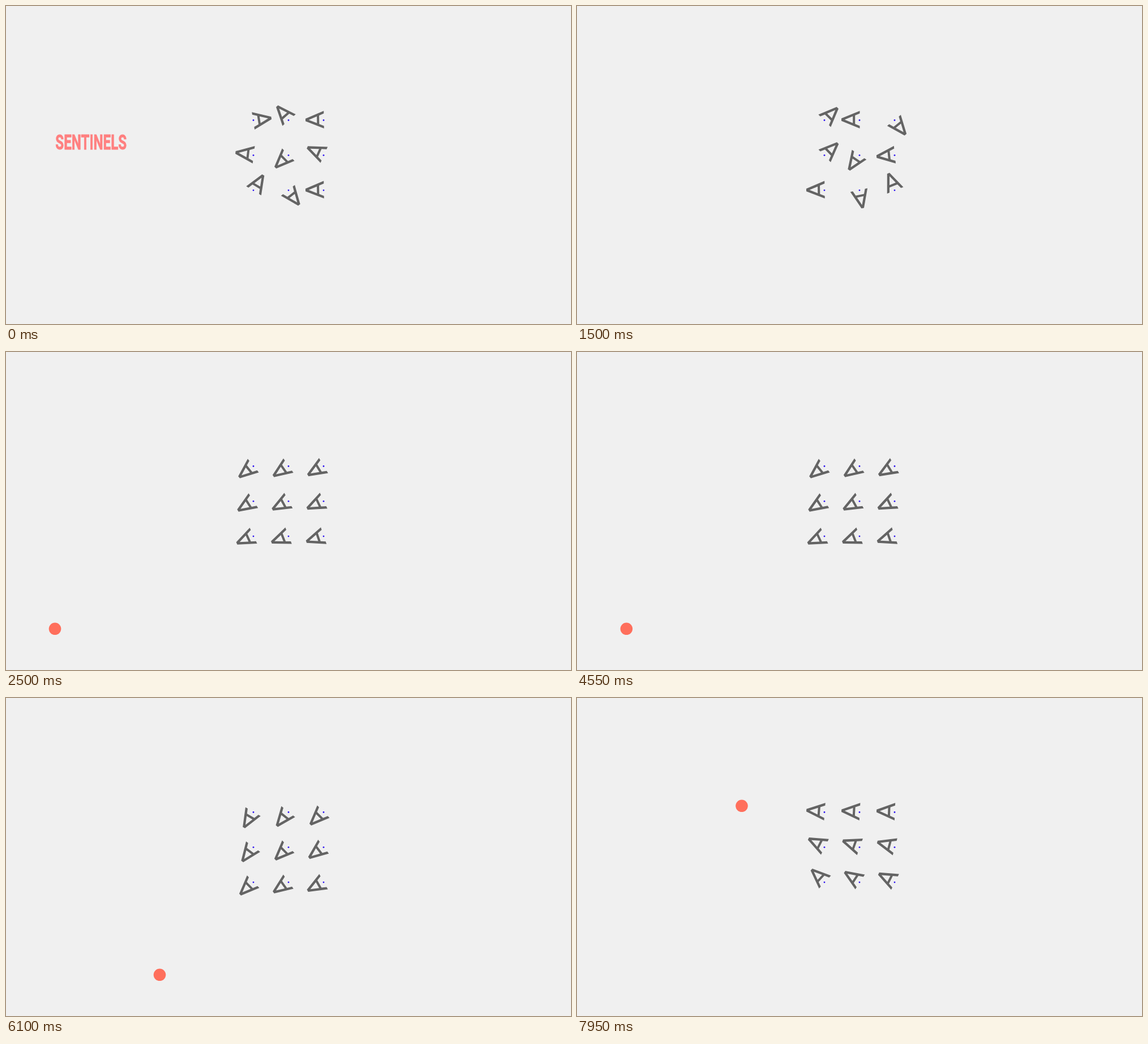
Recreate the animation shown at these times as an HTML page. Size 998 by 561 pixels, loop 8 s.

```html
<!DOCTYPE html>
<html lang="en">
<head>
<meta charset="utf-8">
<title>Sentinels</title>
<style>
  html, body { margin: 0; width: 100%; height: 100%; overflow: hidden; background: #f0f0f0; }
  svg { display: block; width: 998px; height: 561px; }
  #title { font: 700 37.5px Roboto, "Liberation Sans", sans-serif; fill: #ff8080; stroke: #ff8080; stroke-width: .8; }
  #ball { fill: #ff6f5c; }
  #letters path { fill: #646464; fill-rule: evenodd; }
  #letters circle { fill: #2a10f0; }
</style>
</head>
<body>
<svg viewBox="0 0 998 561">
  <text id="title" transform="translate(87.3 253) scale(.645 1)">SENTINELS</text>
  <g id="letters"></g>
  <circle id="ball" r="10.8"/>
</svg>
<script>
const LOOP = 8000;
const GLYPH = 'M-14.5 .5L-1.3-32H3.3L16.5 .5H11.9L8.5-7.8H-6.5L-9.9 .5ZM-4.9-11.8H6.9L1-26.3Z';
const REST_Y = 488.3;

// Headings in degrees, clockwise from up, before the letters find the ball
const headings = [
  [81, 85, 45], [-41, -62, -90], [-91, 0, 141],
  [-83, -18, 46], [-135, -131, -146], [-66, -62, -96],
  [31, -39, -91], [142, 168, 168], [-91, 130, -22]
];

const title = document.getElementById('title');
const ball = document.getElementById('ball');
const group = document.getElementById('letters');

function add(tag, attrs) {
  const el = document.createElementNS('http://www.w3.org/2000/svg', tag);
  for (const key in attrs) el.setAttribute(key, attrs[key]);
  return group.appendChild(el);
}

const letters = headings.map((keys, i) => {
  const x = 437 + (i % 3) * 62;
  const y = 201.5 + Math.floor(i / 3) * 61.8;
  const el = add('path', { d: GLYPH });
  add('circle', { cx: x, cy: y, r: 1.4 });
  return { x, y, keys, el };
});

const clamp = v => Math.min(1, Math.max(0, v));
const mix = (a, b, k) => a + (b - a) * k;
const ease = (t, from, to) => {
  const k = clamp((t - from) / (to - from));
  return k * k * (3 - 2 * k);
};

function ballAt(t) {
  const enter = mix(-40, 86.5, ease(t, 1500, 2500));
  return {
    x: mix(enter, 291, ease(t, 4475, 6485)),
    y: mix(REST_Y, 55, ease(t, 7480, 8230))
  };
}

function angleAt({ x, y, keys: [a, b, c] }, t, target) {
  const look = Math.atan2(target.x - x, y - target.y) * 180 / Math.PI;
  const wander = t < 600 ? mix(a, b, ease(t, 0, 600)) : mix(b, c, ease(t, 600, 1500));
  return mix(wander, look, ease(t, 1500, 2500));
}

function draw(t) {
  const target = ballAt(t);
  ball.setAttribute('cx', target.x);
  ball.setAttribute('cy', target.y);
  title.setAttribute('opacity', 1 - clamp((t - 650) / 800));
  for (const letter of letters) {
    const angle = angleAt(letter, t, target);
    letter.el.setAttribute('transform', `translate(${letter.x} ${letter.y}) rotate(${angle})`);
  }
}

const start = performance.now();
function tick() {
  draw((performance.now() - start) % LOOP);
  requestAnimationFrame(tick);
}
tick();
</script>
</body>
</html>
```
